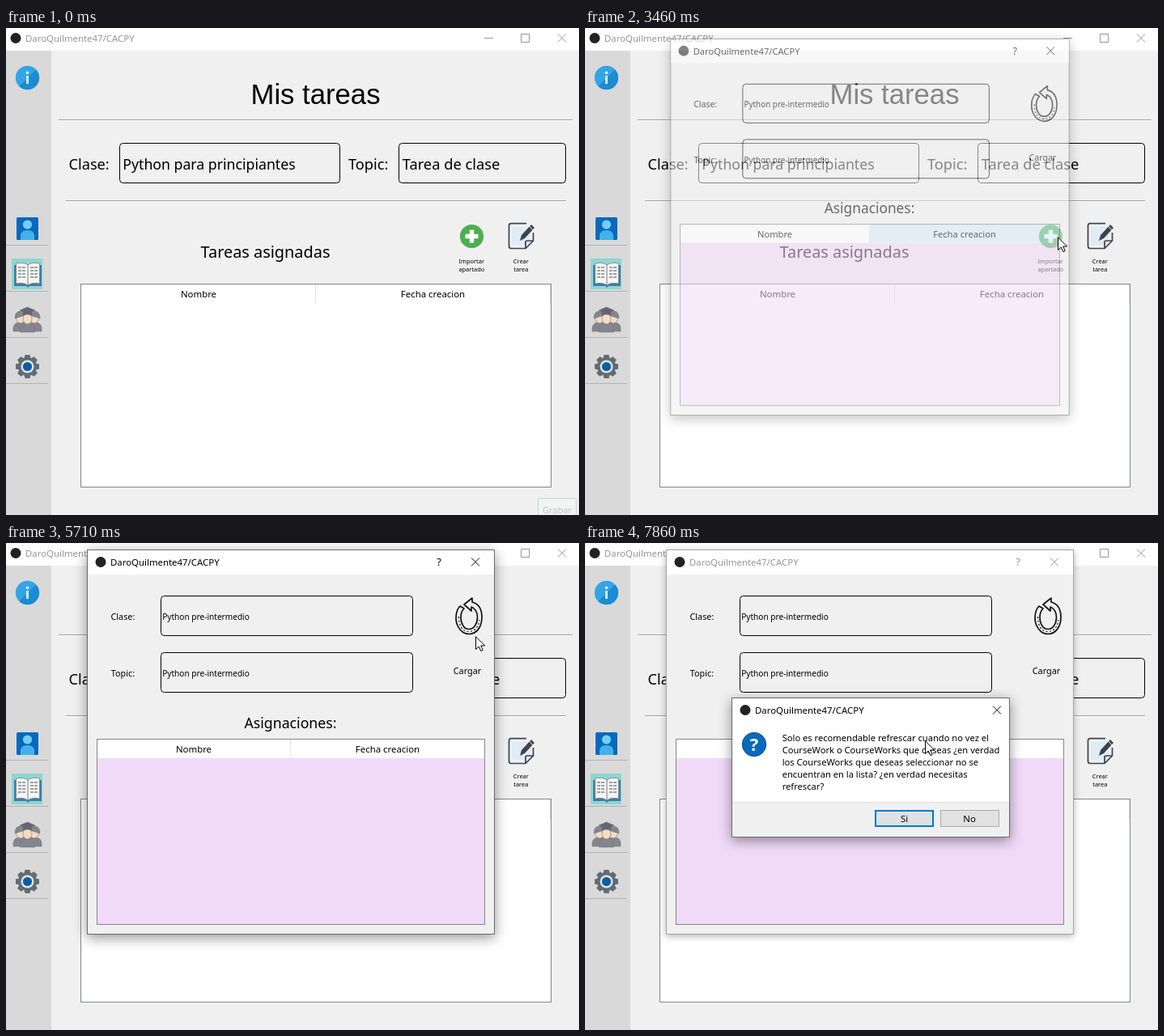
An HTML page that plays this animation: 708x602 px, repeating every 8000 ms.

```html
<!DOCTYPE html>
<html lang="es">
<head>
<meta charset="utf-8">
<title>Mis tareas</title>
<style>
  html, body { margin: 0; width: 100%; height: 100%; overflow: hidden; background: #f0f0f0; }
  svg { display: block; width: 708px; height: 602px; }
  text { font-family: "Noto Sans", "Open Sans", sans-serif; font-size: 11.4px; white-space: pre; }
  .mid { text-anchor: middle; }
  .tiny text { font-size: 7.4px; text-anchor: middle; }
  .bar { color: #979797; }
  .bar text { fill: currentColor; }
  .bar path { stroke: currentColor; fill: none; }
  .on > .bar { color: #000; }
  .logo { fill: #222; }
  .field { fill: #f0f0f0; stroke: #000; }
  .frame { fill: none; stroke: #828790; }
  .edge { fill: #f0f0f0; stroke: #a6a6a6; filter: drop-shadow(0 2px 4px rgba(0,0,0,.3)); }
  .on > .edge { stroke: #6b6b6b; filter: drop-shadow(0 4px 8px rgba(0,0,0,.42)); }
  .line { stroke: #e2e2e2; }
  .hover { fill: #d9ebf9; }
  .win { transform-box: view-box; }
  #dialog { transform-origin: 352px 246px; }
  #box { transform-origin: 353px 278px; }
</style>
</head>
<body>
<svg viewBox="0 0 708 602">
  <defs>
    <linearGradient id="blue" x2="1" y2="1">
      <stop offset=".5" stop-color="#32a5e6"/><stop offset=".5" stop-color="#1b8bd3"/>
    </linearGradient>
    <g id="person">
      <path d="M-9 13V8Q-8 3-3 2H3Q8 3 9 8V13Z"/>
      <ellipse cy="-4" rx="5.5" ry="7" fill="#f2dcc3"/>
    </g>
  </defs>

  <g id="main">
    <rect width="708" height="602" fill="#f0f0f0"/>
    <rect width="708" height="28" fill="#fff"/>
    <g class="bar">
      <circle class="logo" cx="12" cy="12.5" r="6.5"/>
      <text x="24" y="17">DaroQuilmente47/CACPY</text>
      <path d="M591 12.5H602M636.5 7.5H646.5V17.5H636.5ZM682 7.5L692 17.5M692 7.5L682 17.5"/>
    </g>
    <rect y="28" width="56" height="574" fill="#d9d9d9"/>
    <path d="M0 268.5H52M0 325.5H52M0 382.5H52M0 439.5H52" stroke="#b2b2b2"/>

    <circle cx="26.5" cy="61.5" r="14.7" fill="url(#blue)"/>
    <path d="M26.5 59V69" stroke="#fff" stroke-width="2.6"/>
    <circle cx="26.5" cy="55.2" r="1.7" fill="#fff"/>

    <rect x="13" y="234" width="27" height="28" rx="1.5" fill="#0869bc"/>
    <path d="M18 262V257Q18 250 26.5 250T35 257V262Z" fill="#45b1ea"/>
    <circle cx="26.5" cy="243" r="5.6" fill="#74cff5"/>

    <rect x="7" y="285" width="38" height="38" fill="#8dd6d1"/>
    <path d="M10 293H44V319H29L27 321 25 319H10Z" fill="#417ca8"/>
    <path d="M12.500 291Q22 289 27 293Q32 289 41.500 291V316Q32 314 27 318Q22 314 12.500 316Z" fill="#f5f5f2" stroke="#777f86" stroke-width=".8"/>
    <path d="M27 293V318" stroke="#777f86"/>
    <path d="M15 296H24M15 300H24M15 304H24M15 308H24M30 296H39M30 300H39M30 304H39M30 308H39" stroke="#7f8990" stroke-width="1.3" stroke-dasharray="4 1"/>

    <g fill="#85858f" stroke="#777780" stroke-width=".6">
      <use href="#person" x="18" y="362"/><use href="#person" x="35" y="362"/>
      <path d="M11 359Q11 350 18 350T24 355ZM42 359Q42 350 35 350T29 355Z"/>
      <use href="#person" x="26.500" y="363"/>
      <path d="M17 349L26.500 345 36 349 32 351V356Q26.500 352 21 356V351Z" fill="#656570"/>
    </g>

    <g id="gear" transform="translate(26.500 418.500)">
      <g id="teeth" fill="#626c75"></g>
      <circle r="11.500" fill="#626c75"/><circle r="8" fill="#e3e6e8"/><circle r="5.600" fill="#0c5da9"/>
    </g>

    <text class="mid" x="382.5" y="94" style="font:34.7px 'Liberation Sans',Arial,sans-serif">Mis tareas</text>
    <path d="M65 113.500H700M74 213.500H692" stroke="#a0a0a0"/>
    <path d="M65 114.500H700M74 214.500H692" stroke="#fff"/>
    <rect class="field" x="140.500" y="142.500" width="272" height="49" rx="4"/>
    <rect class="field" x="485.500" y="142.500" width="206" height="49" rx="4"/>
    <text x="77.500" y="175" style="font-size:18.2px">Clase:</text>
    <text x="144.300" y="175" style="font-size:17.7px">Python para principiantes</text>
    <text x="423" y="175" style="font-size:18.2px">Topic:</text>
    <text x="489.700" y="175" style="font-size:18.3px">Tarea de clase</text>
    <text x="240.500" y="284" style="font-size:19.9px">Tareas asignadas</text>

    <circle cx="575.5" cy="257.5" r="14.600" fill="#4caf50"/>
    <path d="M567.500 257.500H583.500M575.500 249.500V265.500" stroke="#fff" stroke-width="5.400"/>
    <rect x="625" y="246" width="22" height="22" fill="#dfebf6"/>
    <path d="M643 241.700H624Q621.500 241.700 621.500 244.500V269.500Q621.500 272.500 624 272.500H642L651.500 263V253M642 272V264.500Q642 263 644 263H651" fill="none" stroke="#3b444d" stroke-width="1.700"/>
    <path d="M635 263L637 256 649 243 653 247 641 260Z" fill="#3b444d"/>
    <path d="M646 244L651 250" stroke="#f0f0f0"/>
    <g class="tiny">
      <text x="575.300" y="291">Importar</text><text x="575.300" y="300.500">apartado</text>
      <text x="636.300" y="291">Crear</text><text x="636.300" y="300.500">tarea</text>
    </g>

    <rect x="92" y="316" width="582" height="252" fill="#fff"/>
    <rect id="hoverMain" class="hover" x="383" y="317" width="290" height="24"/>
    <path class="line" d="M382.500 317V341M672.500 317V341"/>
    <rect class="frame" x="92.500" y="316.500" width="581" height="251"/>
    <text class="mid" x="238" y="333">Nombre</text>
    <text class="mid" x="527.500" y="333">Fecha creacion</text>

    <g id="record">
      <rect x="657.500" y="581.500" width="47" height="24" fill="#f2f3f3" stroke="#cbd3d1"/>
      <text x="663" y="600" fill="#bdc5c4" style="font-size:11px">Grabar</text>
    </g>
  </g>

  <g id="dialog" class="win">
    <rect class="edge" x="100.500" y="8.500" width="503" height="475"/>
    <rect x="101" y="9" width="502" height="30" fill="#fff"/>
    <g class="bar">
      <circle class="logo" cx="117" cy="23.500" r="6.500"/>
      <text x="129" y="28">DaroQuilmente47/CACPY</text>
      <text class="mid" x="535" y="28" style="font-size:13px">?</text>
      <path d="M575 18.500L585 28.500M585 18.500L575 28.500"/>
    </g>
    <rect class="field" x="191.500" y="65.500" width="311" height="49" rx="4"/>
    <rect class="field" x="191.500" y="135.500" width="311" height="49" rx="4"/>
    <g style="font-size:10.8px">
      <text x="129.500" y="95" style="font-size:10.8px">Clase:</text>
      <text x="129.800" y="165" style="font-size:10.8px">Topic:</text>
      <text x="193.200" y="95" style="font-size:10.1px">Python pre-intermedio</text>
      <text x="193.200" y="165" style="font-size:10.1px">Python pre-intermedio</text>
      <text class="mid" x="570" y="162" style="font-size:10.8px">Cargar</text>
    </g>
    <g fill="none" stroke="#111" stroke-width="1.700" stroke-linejoin="round">
      <path d="M561 78C555 84 555 96 558 102C562 111 567 112.500 572 112.500C582 112.500 588 103 588 92C588 82 584 75 576 73V68L566 76 575 84V79C580 81 582.500 86 582.500 92C582.500 100 578 106.500 572 106.500C566 106.500 562 100 562 92C562 87 563 84 566 81Z"/>
      <path d="M559.500 91Q560 109.500 572 109.500Q583 109 585 95" stroke-width="1.200" stroke-dasharray="2 2.500"/>
    </g>
    <text class="mid" x="351.500" y="229" style="font-size:17.7px">Asignaciones:</text>
    <rect x="112" y="242" width="480" height="230" fill="#f0daf8"/>
    <rect x="113" y="243" width="478" height="23" fill="#fff"/>
    <rect id="hoverDialog" class="hover" x="352" y="243" width="239" height="23"/>
    <path class="line" d="M351.500 243V266"/>
    <rect class="frame" x="112.500" y="242.500" width="479" height="229"/>
    <text class="mid" x="232" y="259">Nombre</text>
    <text class="mid" x="471.500" y="259">Fecha creacion</text>
  </g>

  <g id="box" class="win on">
    <rect class="edge" x="181.500" y="191.500" width="343" height="172"/>
    <rect x="182" y="192" width="342" height="128" fill="#fff"/>
    <path class="line" d="M182 320.500H524"/>
    <g class="bar">
      <circle class="logo" cx="198" cy="206.500" r="6.500"/>
      <text x="210" y="211">DaroQuilmente47/CACPY</text>
      <path d="M504 201.500L514 211.500M514 201.500L504 211.500"/>
    </g>
    <circle cx="209" cy="249" r="14.700" fill="#0969bd" stroke="#07518f"/>
    <text class="mid" x="209" y="257" fill="#fff" style="font-size:22px;font-weight:600">?</text>
    <g id="message"></g>
    <rect x="359" y="331" width="71" height="19" fill="#e1e1e1" stroke="#0078d7" stroke-width="2"/>
    <rect x="439.500" y="330.500" width="72" height="20" fill="#e1e1e1" stroke="#adadad"/>
    <text class="mid" x="394.500" y="345">Si</text>
    <text class="mid" x="475" y="345">No</text>
  </g>

  <g id="cursor">
    <circle id="halo" r="12" fill="#ff0" opacity=".55"/>
    <path d="M.5 .8V16.500L4.200 13 6.800 18.600 9.200 17.500 6.700 12H11.600Z" fill="#fff" stroke="#000"/>
  </g>
</svg>
<script>
  const LOOP = 8000;
  const $ = id => document.getElementById(id);

  $('teeth').innerHTML = Array.from({ length: 8 }, (_, i) =>
    `<path d="M-4 -10L-3 -14.500H3L4 -10Z" transform="rotate(${i * 45})"/>`).join('');

  $('message').innerHTML = [
    'Solo es recomendable refrescar cuando no vez el',
    'CourseWork o CourseWorks que deseas ¿en verdad',
    'los CourseWorks que deseas seleccionar no se',
    'encuentran en la lista? ¿en verdad necesitas',
    'refrescar?'
  ].map((s, i) => `<text x="243.700" y="${245 + 15 * i}" style="font-size:11.15px">${s}</text>`).join('');

  // Cursor moves: start, end, steps, target x, target y, easing power
  const moves = [
    [670, 670, 1, 683, 581, 1],
    [870, 1020, 3, 620, 463, 1],
    [1420, 1696, 5, 597, 315, 1],
    [1765, 2040, 5, 580, 240, 2],
    [2110, 2180, 2, 583, 262, 1],
    [2250, 2250, 1, 584, 258, 1],
    [4650, 4650, 1, 584, 210, 1],
    [4715, 4980, 5, 586, 147, 2],
    [5440, 5980, 9, 578, 101, 1.5],
    [7530, 7860, 6, 420, 244, 1.5]
  ];

  // Progress from 0 to 1 in n held steps, the first at a and the last at b
  function steps(t, a, b, n) {
    if (t < a) return 0;
    if (t >= b) return 1;
    return (Math.floor((t - a) / (b - a) * (n - 1) + 0.01) + 1) / n;
  }

  const within = (t, a, b) => t >= a && t < b;
  const show = (id, on) => { $(id).style.visibility = on ? 'visible' : 'hidden'; };

  function cursorAt(t) {
    let x = 657, y = 588;
    for (const [a, b, n, tx, ty, power] of moves) {
      const p = 1 - (1 - steps(t, a, b, n)) ** power;
      x += (tx - x) * p;
      y += (ty - y) * p;
    }
    return [x, y];
  }

  function openWindow(id, p) {
    const style = $(id).style;
    style.display = p ? '' : 'none';
    style.opacity = 1 - (1 - p) ** 1.6;
    style.transform = p < 1 ? `scale(${1 - 0.05 * (1 - p) ** 1.7})` : 'none';
  }

  function draw(t) {
    show('record', t < 70);
    show('cursor', t >= 600);
    $('cursor').setAttribute('transform', `translate(${cursorAt(t).map(Math.round)})`);
    $('halo').style.display = within(t, 3260, 3330) || within(t, 6440, 6510) ? '' : 'none';
    $('hoverMain').style.display = within(t, 1625, 1695) ? '' : 'none';
    $('hoverDialog').style.display = t < 4650 ? '' : 'none';
    $('main').classList.toggle('on', within(t, 3260, 3390));
    $('dialog').classList.toggle('on', t < 6585);
    openWindow('dialog', steps(t, 3390, 3660, 5));
    openWindow('box', steps(t, 6660, 6870, 4));
  }

  function tick() {
    draw(performance.now() % LOOP);
    requestAnimationFrame(tick);
  }
  tick();
</script>
</body>
</html>
```
